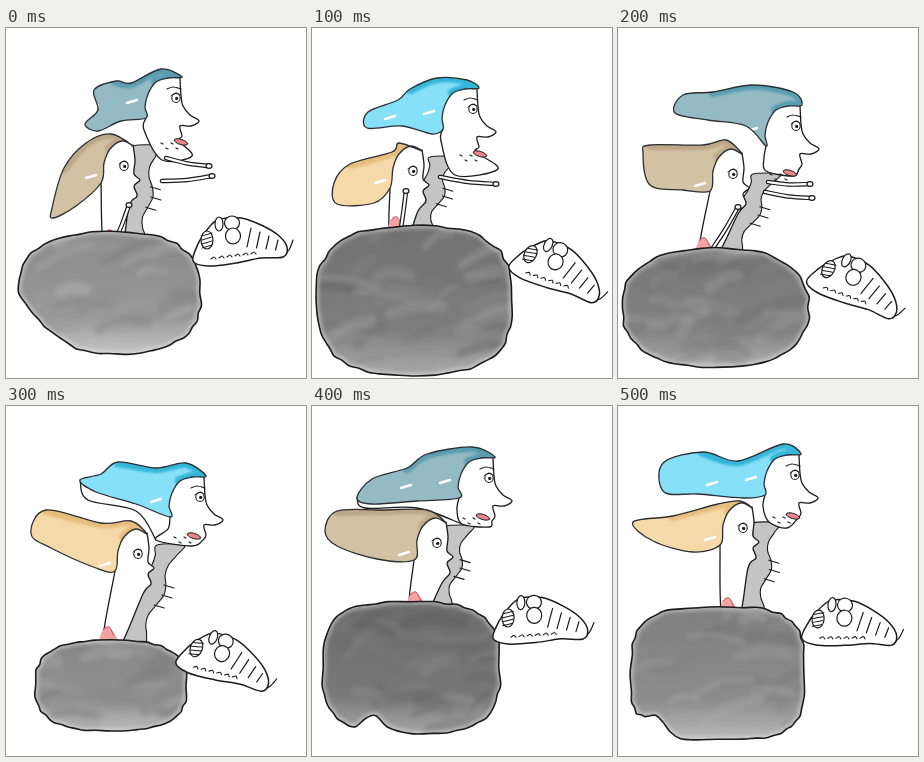
These frames come from a looping animation (300 px wide and 350 px high, 600 ms). An HTML page with a canvas:

```html
<!DOCTYPE html>
<html lang="en">
<head>
<meta charset="utf-8">
<title>Rolling along</title>
<style>
html, body { margin: 0; width: 100%; height: 100%; overflow: hidden; background: #fff; }
canvas { display: block; width: 300px; height: 350px; }
</style>
</head>
<body>
<canvas id="stage"></canvas>
<script>
const HOLD = 100;
const INK = '#1b1b1b';
const canvas = document.getElementById('stage');
const ctx = canvas.getContext('2d');
const dpr = window.devicePixelRatio || 1;
canvas.width = 300 * dpr;
canvas.height = 350 * dpr;

// eye / eye2 place the two heads; chin, jaw and lip are relative to the eye.
// rock: left, top, right, bottom, squareness. grub: x, y, degrees.
const poses = [
  { eye: [170, 70], chin: [16, 58], jaw: [-14, 62], lip: [5, 44],
    blue: '115,93 92,103 79,96 92,82 88,62 110,53 125,55 155,41',
    eye2: [118, 138], base: [97, 214], tan: '70,178 47,190 46,180 58,140 80,115 105,106',
    arms: ['160,130 203,138', '156,153 206,148', '109,213 123,177'],
    rock: [13, 204, 195, 326, 2.6], slope: 35, tone: 148, grub: [201, 213, 0] },
  { eye: [161, 81], chin: [25, 60], jaw: [-18, 66], lip: [7, 45],
    blue: '120,106 90,98 55,100 56,84 86,72 98,61 125,50 155,52',
    eye2: [101, 143], base: [77, 201], tan: '62,175 25,176 22,155 38,136 80,124 87,115',
    arms: ['128,149 184,156', '89,200 94,163'],
    rock: [4, 198, 201, 347, 2.7], tone: 122, grub: [218, 227, 26] },
  { eye: [178, 98], chin: [-3, 50], jaw: [-30, 45], lip: [-6, 47],
    blue: '128,98 90,92 57,85 65,67 95,64 135,57 175,64',
    eye2: [115, 146], base: [79, 222], tan: '65,162 32,157 25,125 32,117 85,117 108,112',
    arms: ['150,154 192,156', '147,164 194,170', '95,220 120,179'],
    rock: [4, 220, 191, 339, 2.4], tone: 126, grub: [210, 242, 27] },
  { eye: [194, 91], chin: [-8, 49], jaw: [-44, 43], lip: [-6, 39], sag: 20,
    blue: '130,98 90,86 74,74 95,68 112,56 150,62 180,57',
    eye2: [132, 148], base: [95, 233], tan: '90,162 45,142 25,128 40,104 95,117 125,115',
    arms: [],
    rock: [29, 234, 181, 325, 2.7], tone: 143, grub: [190, 243, 21] },
  { eye: [177, 72], chin: [0, 49], jaw: [-27, 46], lip: [-6, 39], sag: 10,
    blue: '105,95 60,98 45,92 60,73 95,62 115,48 160,41',
    eye2: [125, 137], base: [96, 198], tan: '65,153 25,140 13,125 25,105 70,104 115,104',
    arms: [],
    rock: [10, 196, 188, 328, 3.1], dent: 62, tone: 116, grub: [196, 213, 3] },
  { eye: [177, 69], chin: [-8, 53], jaw: [-26, 47], lip: [-2, 41],
    blue: '125,92 80,88 46,86 45,57 85,46 120,55 165,38',
    eye2: [125, 122], base: [103, 204], tan: '75,146 35,135 15,116 55,110 100,98 122,95',
    arms: [],
    rock: [13, 201, 187, 334, 3.4], dent: 38, tone: 136, grub: [200, 214, 7] }
];

// Outlines shared by every pose, relative to the eye.
const PROFILE = '4,-20 5,-2 7,8 14,17 23,23 15,28 4,28 6,38 3,43';
const FRINGE = '6,-21 -8,-20 -20,-16 -28,-4 -31,9 -30,20';
const PROFILE2 = '9,-21 11,-6 10,8 16,14 10,20 13,30 5,40';
const FRINGE2 = '9,-20 -2,-25 -14,-17 -20,-3 -23,17';

const DULL = { blue: ['#94bac4', '#5a9db0'], tan: ['#d3c1a3', '#bca788'] };
const VIVID = { blue: ['#86e0f8', '#35b5d8'], tan: ['#f6d9a9', '#e6bd7d'] };

const points = (text, [dx, dy] = [0, 0]) => text.split(' ').map(p => {
  const [x, y] = p.split(',').map(Number);
  return [x + dx, y + dy];
});
const add = (a, b) => [a[0] + b[0], a[1] + b[1]];
const gray = v => `rgb(${v},${v},${v})`;

function rng(seed) {
  return () => (seed = (seed * 16807) % 2147483647) / 2147483647;
}

// Smooth curve through the points.
function curve(pts, closed) {
  const path = new Path2D();
  const n = pts.length;
  const at = i => closed ? pts[(i + n) % n] : pts[Math.max(0, Math.min(n - 1, i))];
  path.moveTo(...pts[0]);
  for (let i = 0; i < (closed ? n : n - 1); i++) {
    const [a, b, c, d] = [at(i - 1), at(i), at(i + 1), at(i + 2)];
    path.bezierCurveTo(b[0] + (c[0] - a[0]) / 6, b[1] + (c[1] - a[1]) / 6,
      c[0] - (d[0] - b[0]) / 6, c[1] - (d[1] - b[1]) / 6, c[0], c[1]);
  }
  if (closed) path.closePath();
  return path;
}

function ink(path, width = 1.3, color = INK) {
  ctx.strokeStyle = color;
  ctx.lineWidth = width;
  ctx.stroke(path);
}

function shape(pts, fill, closed = true, width = 1.3) {
  const path = curve(pts, closed);
  ctx.fillStyle = fill;
  ctx.fill(path);
  if (width) ink(path, width);
  return path;
}

function line(pts, width = 1.2, color = INK) {
  ink(curve(pts, false), width, color);
}

function oval(x, y, rx, ry, fill, width = 1.2, turn = 0) {
  const path = new Path2D();
  path.ellipse(x, y, rx, ry, turn, 0, Math.PI * 2);
  ctx.fillStyle = fill;
  ctx.fill(path);
  if (width) ink(path, width);
}

function eye(at) {
  const [x, y] = at;
  oval(x, y, 4.2, 4.5, '#fff', 1.1);
  oval(x + 0.7, y + 0.4, 1.6, 1.7, INK, 0);
  line(points('-5,-2 0,-5 4,-3', at), 1);
}

function hair(fringe, tail, [body, edge], shine) {
  const path = shape([...fringe, ...tail], body, true, 0);
  ctx.save();
  ctx.clip(path);
  ctx.filter = `blur(${dpr}px)`;
  line([...tail.slice(-3), fringe[0], fringe[1], fringe[2]], 10, edge);
  ctx.filter = 'none';
  for (const [x, y] of shine) line([[x - 5, y + 1], [x + 5, y - 2]], 2.5, '#fff');
  ctx.restore();
  ink(path, 1.3, '#2b2f33');
}

// Strip from the jaw to the base with a rippled right edge.
function dress(top, foot) {
  const left = [], right = [];
  for (let i = 0; i <= 10; i++) {
    const t = i / 10;
    const x = top[0] + (foot[0] - top[0]) * t;
    const y = top[1] + (foot[1] - top[1]) * t;
    left.unshift([x - 11 + 3 * Math.sin(t * 9), y]);
    right.push([x + 12 + 4 * Math.cos(t * 13), y]);
  }
  shape([...right, ...left], '#c4c4c4', true, 1.1);
  for (let i = 4; i < 7; i++) {
    const [x, y] = right[i];
    line([[x - 2, y], [x + 8, y + 3]]);
  }
}

function arm(text) {
  const [a, b] = points(text);
  const path = curve([a, [(a[0] + b[0]) / 2, (a[1] + b[1]) / 2 + 1.5], b], false);
  ink(path, 4.6);
  ink(path, 2.2, '#fff');
  oval(b[0], b[1], 3, 2.3, '#fff');
}

function boulder({ rock, slope = 0, dent, tone }, seed) {
  const [x0, y0, x1, y1, power] = rock;
  const cx = (x0 + x1) / 2, cy = (y0 + y1) / 2;
  const rx = (x1 - x0) / 2, ry = (y1 - y0) / 2;
  const rand = rng(seed * 977 + 41);
  const round = v => Math.sign(v) * Math.abs(v) ** (2 / power);
  const pts = [];
  for (let i = 0; i < 52; i++) {
    const a = i / 52 * Math.PI * 2;
    const c = round(Math.cos(a)), s = round(Math.sin(a));
    const grow = 1 + (rand() - 0.5) * 0.028;
    let x = cx + rx * c * grow, y = cy + ry * s * grow;
    if (s > 0 && c < 0) x += slope * s * -c;
    if (s > 0 && dent) y -= 17 * Math.exp(-(((x - dent) / 14) ** 2));
    pts.push([x, y]);
  }
  const path = curve(pts, true);

  ctx.save();
  ctx.clip(path);
  const shade = ctx.createLinearGradient(cx, y0, cx, y1);
  shade.addColorStop(0, gray(tone - 8));
  shade.addColorStop(0.7, gray(tone + 4));
  shade.addColorStop(1, gray(tone + 50));
  ctx.fillStyle = shade;
  ctx.fillRect(0, y0 - 9, 300, y1 - y0 + 18);
  ctx.filter = `blur(${2 * dpr}px)`;
  ctx.globalAlpha = 0.32;
  for (let i = 0; i < 40; i++) {
    const x = x0 + rand() * rx * 2, y = y0 + rand() * ry * 2;
    const w = 10 + rand() * 22, h = (rand() - 0.3) * 18;
    const v = Math.round(tone + (rand() - 0.42) * 80);
    line([[x - w, y + h], [x, y - 4], [x + w, y - h]], 5 + rand() * 8, gray(v));
  }
  ctx.globalAlpha = 0.6;
  ink(path, 5, '#e8e8e8');
  ctx.restore();
  ink(path, 1.6);
}

function grub([x, y, turn]) {
  ctx.save();
  ctx.translate(x, y);
  ctx.rotate(turn * Math.PI / 180);
  ctx.translate(-201, -213);
  line(points('276,228 283,222 287,212'));
  shape(points('187,233 192,216 198,206 206,196 214,191 235,190 255,197 272,207 281,219 277,229 255,230 230,235 202,238'), '#fff', true, 1.5);
  oval(213, 196, 4, 7, '#fff');
  oval(226, 195, 7.5, 7, '#fff');
  oval(227, 208, 7.5, 8, '#fff');
  oval(201, 212, 6, 9, '#fff');
  for (let i = 0; i < 4; i++) {
    line([[196, 208 + i * 4], [206, 205 + i * 4]], 1);
    line([[245 + i * 9, 200 + i * 4], [241 + i * 9.5, 219 + i]], 1.2);
  }
  for (let i = 0; i < 6; i++) {
    const dx = 205 + i * 8;
    line([[dx, 231 - i], [dx + 3, 229 - i], [dx + 5, 231 - i]], 1.1);
  }
  ctx.restore();
}

function blueHead(p, colors) {
  const fringe = points(FRINGE, p.eye);
  const tail = points(p.blue);
  const nape = fringe[fringe.length - 1];
  const chin = add(p.eye, p.chin), jaw = add(p.eye, p.jaw);
  if (p.sag) {
    const tip = tail[2];
    shape([tip, add(tip, [8, p.sag]), add(tail[0], [0, 7]), jaw], '#fff', false);
  }
  shape([...points(PROFILE, p.eye), chin, jaw, add(nape, [-2, 12]), nape], '#fff', false);
  hair(fringe, tail, colors, [add(p.eye, [-44, 4]), add(p.eye, [-83, 9])]);
  const [x, y] = add(p.eye, p.lip);
  oval(x, y, 7, 2.6, '#e9868c', 1, 0.3);
  line(points('-9,-9 -3,-11 5,-9', p.eye));
  for (let i = 0; i < 4; i++) {
    line([[x - 5 - i * 5, y + 6 - (i % 2) * 5], [x - 3 - i * 5, y + 7 - (i % 2) * 5]]);
  }
  eye(p.eye);
}

function tanHead(p, colors) {
  const [x, y] = p.base;
  const fringe = points(FRINGE2, p.eye2);
  const back = fringe[fringe.length - 1];
  shape([...points(PROFILE2, p.eye2), [x + 18, y + 9], [x + 1, y + 9], back], '#fff', false);
  hair(fringe, points(p.tan), colors, [add(p.eye2, [-33, 11])]);
  eye(p.eye2);
  shape(points('-1,4 2,-9 8,-12 17,4', p.base), '#f2a3a3', true, 0);
  line(points('2,-9 8,-12 13,-3', p.base), 1, '#cf4d55');
}

function draw(i) {
  const p = poses[i];
  const colors = i % 2 ? VIVID : DULL;
  ctx.setTransform(dpr, 0, 0, dpr, 0, 0);
  ctx.fillStyle = '#fff';
  ctx.fillRect(0, 0, 300, 350);
  ctx.lineCap = ctx.lineJoin = 'round';

  const neck = add(p.eye, [-32, 48]);
  dress(neck, add(p.base, [27, 6]));
  blueHead(p, colors.blue);
  tanHead(p, colors.tan);
  p.arms.forEach(arm);
  boulder(p, i + 1);
  grub(p.grub);
}

let shown = -1;
function tick() {
  const i = Math.floor(performance.now() / HOLD) % poses.length;
  if (i !== shown) draw(shown = i);
  requestAnimationFrame(tick);
}
tick();
</script>
</body>
</html>
```
